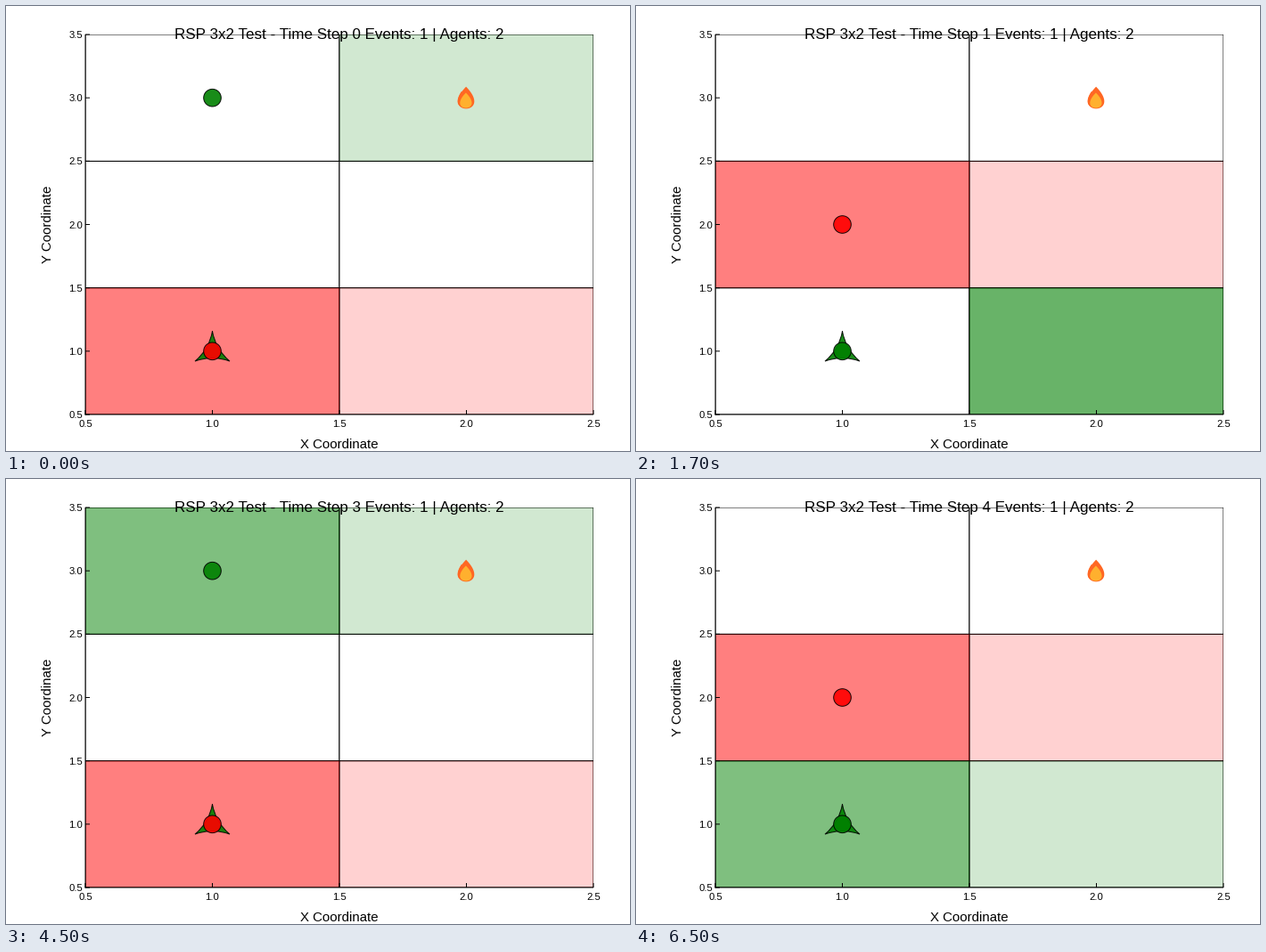
Recreate the animation shown at these times as a matplotlib script. Size 700 px wide and 500 px high, loop 8000 ms.

```python
import matplotlib.pyplot as plt
import numpy as np
from matplotlib.animation import FuncAnimation
from matplotlib.patches import Circle, PathPatch, Rectangle
from matplotlib.path import Path

W, H, DPI = 700, 500, 100
LEFT, RIGHT, TOP, BOTTOM = 89, 659, 32, 459
COLS, ROWS = 2, 3
PX = 72 / DPI
INTERVAL, FRAMES = 500, 16

plt.rcParams["font.family"] = "Liberation Sans"
plt.rcParams["path.snap"] = False

fig = plt.figure(figsize=(W / DPI, H / DPI), dpi=DPI, facecolor="white")
ax = fig.add_axes([0, 0, 1, 1])


def px(x):
    return LEFT + (x - 0.5) / COLS * (RIGHT - LEFT)


def py(y):
    return BOTTOM - (y - 0.5) / ROWS * (BOTTOM - TOP)


def text(x, y, s, size, ha="center", **kw):
    ax.text(x, y, s, fontsize=size * PX, ha=ha, va="baseline", color="black", **kw)


def line(x0, y0, x1, y1):
    ax.plot([x0, x1], [y0, y1], color="black", lw=PX, solid_capstyle="butt")


def cell(col, row, color="white", alpha=1):
    x, y = px(col + 0.5), py(row + 1.5)
    patch = Rectangle((x, y), (RIGHT - LEFT) / COLS, (BOTTOM - TOP) / ROWS,
                      fc=color, ec="black", lw=PX, alpha=alpha)
    ax.add_patch(patch)
    patch.set_clip_path(Rectangle((LEFT, TOP), RIGHT - LEFT, BOTTOM - TOP,
                                  transform=ax.transData))


def agent(row, color):
    ax.add_patch(Circle((px(1), py(row + 1)), 9.8, fc=color, ec="black",
                        lw=PX, alpha=0.9))


def base_marker(tip=22.5, waist=4):
    """Three-pointed star with sides curving inwards."""
    angle = np.radians(90 + 60 * np.arange(7))
    radius = np.where(np.arange(7) % 2, waist, tip)
    verts = np.column_stack([px(1) + radius * np.cos(angle),
                             py(1) - radius * np.sin(angle)])
    codes = [Path.MOVETO] + [Path.CURVE3] * 6
    ax.add_patch(PathPatch(Path(verts, codes), fc="green", ec="black",
                           lw=PX, alpha=0.9))


def teardrop(dx, top, bottom, width, color):
    """Pointed above, round below; offsets are from the fire's centre."""
    t = np.linspace(0, 2 * np.pi, 60)
    x = px(2) + dx + 0.65 * width * np.sin(t) * np.abs(np.sin(t / 2))
    y = py(3) + top + (bottom - top) * (1 - np.cos(t)) / 2
    ax.fill(x, y, color=color, lw=0)


def fire():
    teardrop(-0.4, -12.5, 12.2, 18.4, "#ff6723")
    teardrop(-5.4, -7.5, 9.5, 9, "#ff6723")
    teardrop(-0.6, -5.7, 11.4, 13.2, "#ffb02e")


def axes_and_labels(step):
    line(LEFT, TOP, LEFT, BOTTOM + 0.5)
    line(LEFT - 0.5, BOTTOM, RIGHT, BOTTOM)
    for v in np.arange(0.5, ROWS + 1, 0.5):
        line(LEFT, py(v), LEFT + 5, py(v))
        text(LEFT - 2.7, py(v) + 4, f"{v:.1f}", 11.2, ha="right")
    for v in np.arange(0.5, COLS + 1, 0.5):
        line(px(v), BOTTOM, px(v), BOTTOM - 5)
        text(px(v), 473, f"{v:.1f}", 11.2)
    text(374, 497, "X Coordinate", 15)
    text(51, 245, "Y Coordinate", 15, rotation=90, rotation_mode="anchor")
    text(374, 37, f"RSP 3x2 Test - Time Step {step} Events: 1 | Agents: 2", 17.05)


def draw(frame):
    step = (frame + 3) // 4
    red_row, green_row = step % ROWS, (step + 2) % ROWS

    ax.clear()
    ax.set(xlim=(0, W), ylim=(H, 0))
    ax.axis("off")

    for row in range(ROWS):
        for col in range(COLS):
            cell(col, row)
    cell(1, red_row, "red", 0.18)
    cell(0, red_row, "red", 0.5)
    cell(1, green_row, "green", 0.18)
    if step > 0:
        cell(1 if step < 3 else 0, green_row, "green", 0.5)

    base_marker()
    agent(green_row, "green")
    agent(red_row, "red")
    fire()
    axes_and_labels(step)
    return []


anim = FuncAnimation(fig, draw, frames=FRAMES, interval=INTERVAL,
                     init_func=lambda: draw(0), repeat=True, repeat_delay=0)
plt.show()
```
